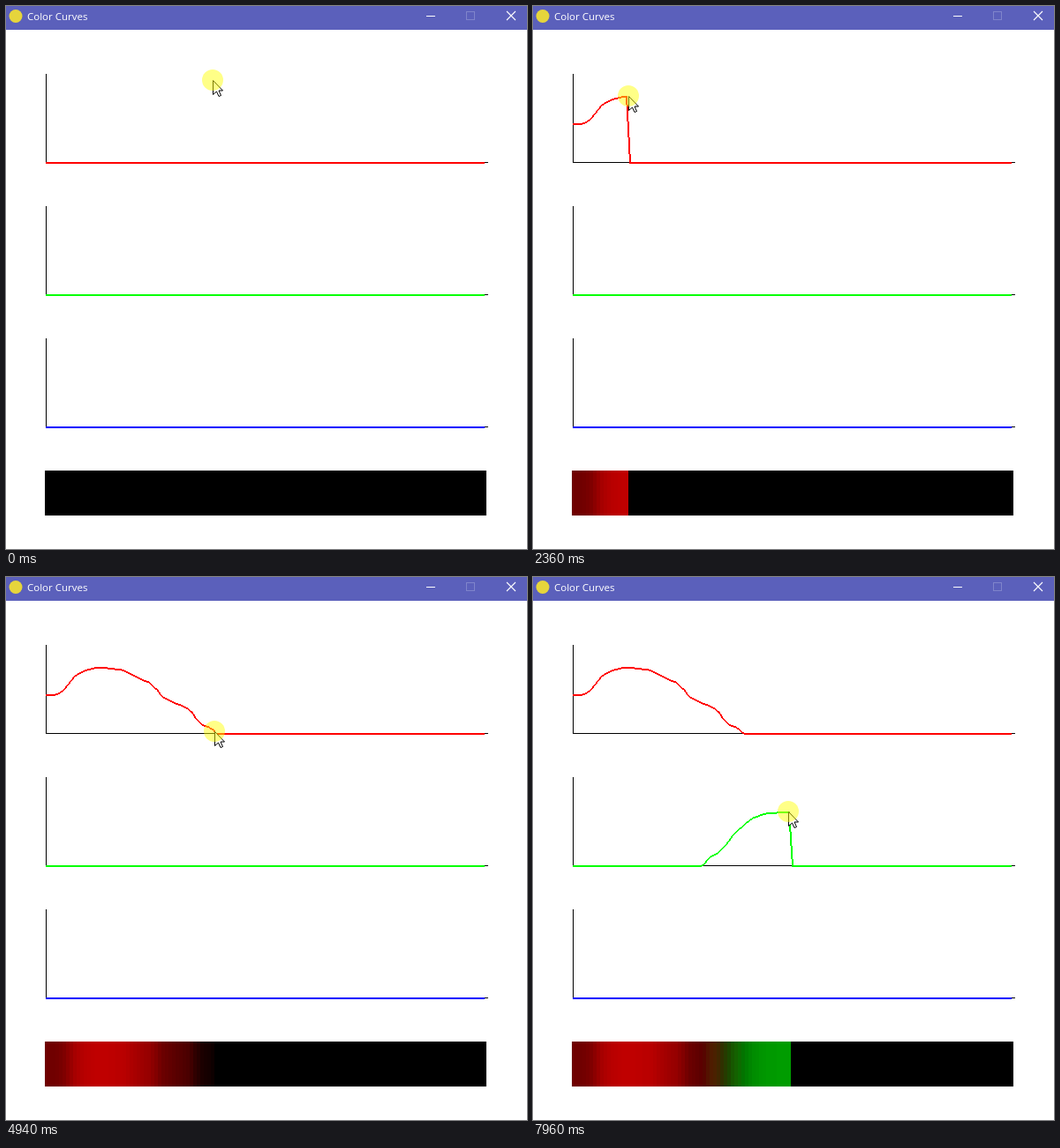
An HTML page with a canvas that plays this animation: 590x616 px, repeating every 8000 ms.

```html
<!DOCTYPE html>
<html lang="en">
<head>
<meta charset="utf-8">
<title>Color Curves</title>
<style>
  html, body { margin: 0; width: 590px; height: 616px; overflow: hidden; background: #fff; }
  canvas, svg { position: absolute; left: 0; top: 0; display: block; }
  text { font: 11.5px "Open Sans", "Noto Sans", sans-serif; fill: #fff; }
</style>
</head>
<body>
<canvas id="stage" width="590" height="616"></canvas>
<svg width="590" height="27">
  <rect width="590" height="27" fill="#5b60bb"/>
  <circle cx="11" cy="11.5" r="7.5" fill="#e6d53c"/>
  <text x="24" y="16">Color Curves</text>
  <g fill="none" stroke="#fff">
    <path d="M476 11.5h10"/>
    <rect x="521.5" y="6.5" width="9" height="9" stroke="#7f84cb"/>
    <path d="M567 6l10 10M577 6l-10 10" stroke-width="1.1"/>
  </g>
</svg>
<script>
const LOOP = 8000, LEFT = 45, CELL = 4, COUNT = 125;
const ctx = document.getElementById('stage').getContext('2d');

// Smooth curve through key points that never overshoots them
function spline(points) {
  const slope = i => (points[i + 1][1] - points[i][1]) / (points[i + 1][0] - points[i][0]);
  const tangents = points.map((_, i) => {
    if (i === 0 || i === points.length - 1) return 0;
    const a = slope(i - 1), b = slope(i);
    return a * b > 0 ? 2 * a * b / (a + b) : 0;
  });
  return x => {
    const i = points.findLastIndex(p => p[0] <= x);
    if (i < 0) return points[0][1];
    if (i === points.length - 1) return points[i][1];
    const [x0, y0] = points[i], [x1, y1] = points[i + 1];
    const w = x1 - x0, s = (x - x0) / w, r = 1 - s;
    return y0 + (y1 - y0) * s * s * (3 - 2 * s)
      + w * s * r * (tangents[i] * r - tangents[i + 1] * s);
  };
}

// Height of each drawn curve above its axis
const redCurve = spline([
  [45, 44], [57, 45], [81, 68], [89, 72], [106, 75], [128, 73], [157, 60], [162, 58],
  [175, 44], [188, 36], [203, 30], [209, 25], [214, 18], [223, 10], [231, 7], [239, 0]
]);
const greenCurve = spline([
  [190, 0], [201, 11], [207, 14], [217, 23], [225, 34], [237, 45], [249, 55], [269, 60], [289, 61]
]);

// Pointer place over time; while drawing, its y follows the curve
const pointerX = spline([
  [80, 234], [940, 43], [1180, 58], [1820, 83], [2340, 108], [2660, 128], [3460, 157],
  [3700, 157], [4560, 228], [4940, 236], [5340, 247], [5420, 247], [6140, 170],
  [6300, 187], [6920, 225], [7160, 237], [7400, 237], [7960, 289]
]);
const pointerY = spline([
  [80, 84], [940, 132], [4940, 174], [5340, 197], [5420, 197], [6140, 335], [6300, 331]
]);

// The picture refreshes about every 78 ms within these spans
const SPANS = [
  [160, 940], [1020, 1820], [1900, 2660], [2740, 3460], [3780, 4560],
  [4640, 5340], [5500, 6300], [6380, 7160], [7480, 7960]
];
const STEPS = [0];
for (const [from, to] of SPANS) {
  const n = Math.round((to - from) / 78);
  for (let i = 0; i <= n; i++) STEPS.push(Math.floor((from + (to - from) * i / n) / 20) * 20);
}

function box(x, y, w, h, color) {
  ctx.fillStyle = color;
  ctx.fillRect(x, y, w, h);
}

// Hard-edged line, two pixels thick across its main direction
function thickLine(x0, y0, x1, y1, color) {
  const dx = x1 - x0, dy = y1 - y0;
  const steep = Math.abs(dy) > Math.abs(dx);
  const n = Math.max(Math.abs(dx), Math.abs(dy));
  for (let i = 0; i <= n; i++) {
    const x = Math.round(x0 + dx * i / n), y = Math.round(y0 + dy * i / n);
    box(x, y, steep ? 2 : 1, steep ? 1 : 2, color);
  }
}

function heights(curve, last) {
  return Array.from({ length: COUNT }, (_, i) =>
    i <= last ? Math.round(curve(LEFT + i * CELL)) : 0);
}

function graph(base, values, color) {
  box(45, base - 100, 1, 101, '#000');
  box(45, base, 501, 1, '#000');
  for (let i = 1; i < COUNT; i++) {
    const x = LEFT + i * CELL;
    thickLine(x - CELL, base - values[i - 1], x, base - values[i], color);
  }
}

function pointer(x, y) {
  const shape = [[0, 0], [0, 16], [4, 12.5], [6.5, 18], [9, 17], [6.5, 11.5], [11, 11.5]];
  ctx.beginPath();
  for (const [px, py] of shape) ctx.lineTo(x + px + 0.5, y + py + 0.5);
  ctx.closePath();
  ctx.fillStyle = '#fff';
  ctx.strokeStyle = '#000';
  ctx.fill();
  ctx.stroke();
  ctx.beginPath();
  ctx.arc(x, y, 12, 0, Math.PI * 2);
  ctx.fillStyle = 'rgba(255,255,0,0.47)';
  ctx.fill();
}

function draw(time) {
  const t = STEPS.findLast(s => s <= time);
  const x = Math.round(pointerX(t));
  const cell = Math.floor((x - LEFT) / CELL);
  const drawRed = t >= 1020 && t <= 4940, drawGreen = t >= 6380;
  const red = heights(redCurve, drawRed ? cell : t > 4940 ? COUNT : -1);
  const green = heights(greenCurve, drawGreen ? cell : -1);
  const blue = heights(null, -1);
  const y = drawRed ? 177 - redCurve(x) : drawGreen ? 327 - greenCurve(x) : pointerY(t);

  box(0, 0, 590, 616, '#fff');
  graph(177, red, '#f00');
  graph(327, green, '#0f0');
  graph(477, blue, '#00f');
  for (let i = 0; i < COUNT; i++) {
    const rgb = [red[i], green[i], blue[i]].map(v => Math.round(v * 2.55));
    box(44 + i * CELL, 527, CELL, 51, `rgb(${rgb})`);
  }
  pointer(x, Math.round(y));
}

const start = performance.now();
function tick() {
  draw((performance.now() - start) % LOOP);
  requestAnimationFrame(tick);
}
tick();
</script>
</body>
</html>
```
